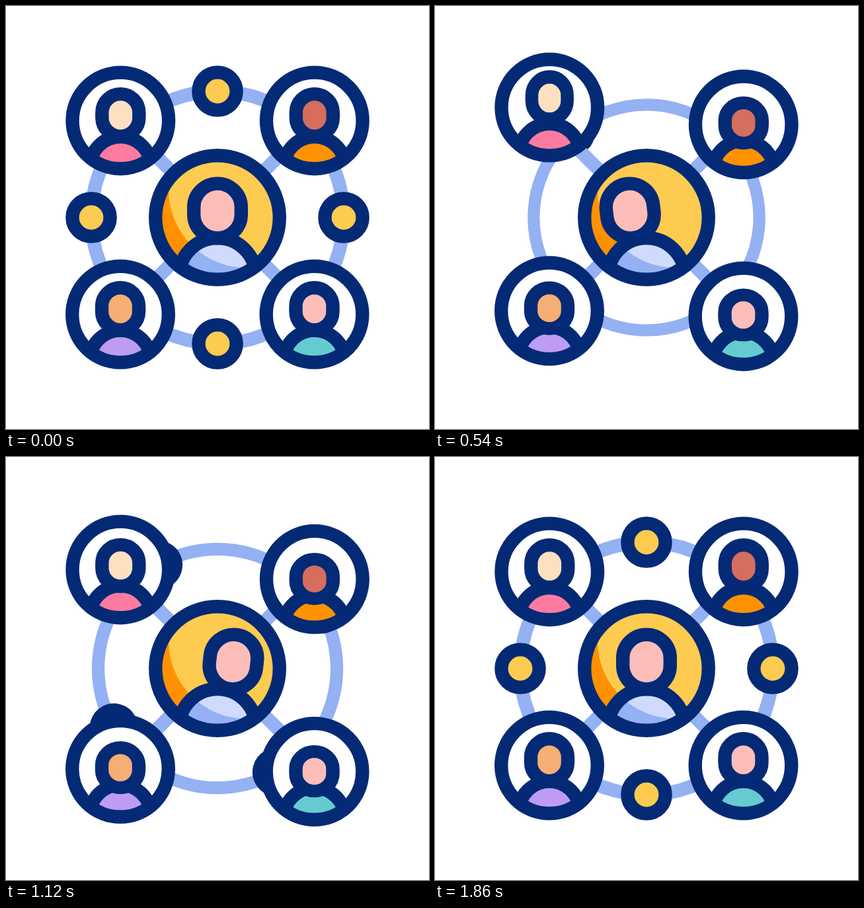
Recreate the animation shown at these times as an HTML page. Size 640 by 640 pixels, loop 2.4 s.

```html
<!DOCTYPE html>
<html>
<head>
<meta charset="utf-8">
<style>
  html, body { margin: 0; width: 100%; height: 100%; overflow: hidden; background: #fff; }
  svg { display: block; width: 100vw; height: 100vh; }
  .line { stroke: #042a76; stroke-width: 20.4; }
  .link { stroke: #93b1f3; stroke-width: 20.4; fill: none; }
</style>
</head>
<body>
<svg viewBox="0 0 640 640">
  <defs>
    <clipPath id="small"><circle r="70"/></clipPath>
    <clipPath id="big"><circle cx="320" cy="320" r="92"/></clipPath>
    <clipPath id="chest"><circle cx="320" cy="409" r="58"/></clipPath>
    <clipPath id="lit"><circle cx="363.5" cy="278.3" r="117.6"/></clipPath>
  </defs>
  <g id="orbit"></g>
  <path class="link" d="M173 173L467 467M467 173L173 467"/>
  <g id="people"></g>
  <g clip-path="url(#big)">
    <circle cx="320" cy="320" r="92" fill="#ff9100"/>
    <circle cx="320" cy="320" r="92" fill="#fdcb50" clip-path="url(#lit)"/>
    <g clip-path="url(#chest)">
      <circle cx="320" cy="409" r="58" fill="#93b1f3"/>
      <circle cx="320" cy="409" r="58" fill="#d0dafc" clip-path="url(#lit)"/>
    </g>
    <circle class="line" cx="320" cy="409" r="58" fill="none"/>
    <rect id="head" class="line" x="284.2" y="268.6" width="71.6" height="82.6" rx="35.8" fill="#fdbdb9"/>
  </g>
  <circle class="line" cx="320" cy="320" r="93.8" fill="none"/>
</svg>
<script>
const $ = id => document.getElementById(id);

// x, y, delay, skin, shirt
const people = [
  [173.3, 173.4, 0, '#fde0c0', '#fe7ba0'],
  [466.8, 173.4, 170, '#d66e5e', '#fe9200'],
  [173, 466.5, 90, '#f6ae74', '#be9cf4'],
  [466.5, 466.5, 140, '#fdbdb9', '#66cbd0']
];

// keys as [time, value]
const ringSize = [[20, 1], [680, .881], [1520, 1]];
const sway = [[20, 0], [480, -26], [1100, 24], [1590, 0]];
const bounce = [[120, 0], [350, 6.5], [580, -22], [880, 13.7], [1250, -9.5], [1520, 0]];
const nod = [[180, 0], [400, 8.5], [620, -12], [960, 10.8], [1290, -5.8], [1600, 0]];

$('orbit').innerHTML = '<circle class="link" r="191"/>' + [0, 90, 180, 270].map(a =>
  `<circle class="line" cy="-191" r="28.6" fill="#fdcb50" transform="rotate(${a})"/>`).join('');

$('people').innerHTML = people.map(([, , , skin, shirt]) => `<g>
  <circle r="72.8" fill="#fff"/>
  <g clip-path="url(#small)">
    <circle class="line" cy="71" r="46.6" fill="${shirt}"/>
    <g><rect class="line" x="-28" y="10.2" width="56" height="64" rx="28" fill="${skin}"/></g>
  </g>
  <circle class="line" r="72.8" fill="none"/></g>`).join('');

const smooth = u => u * u * (3 - 2 * u);

// slightly sharper ease: solves the curve (.362, 0, .638, 1) for x = u
function ease(u) {
  let lo = 0, hi = 1;
  for (let i = 0; i < 20; i++) {
    const s = (lo + hi) / 2, r = 1 - s;
    if (3 * s * r * (r * .362 + s * .638) + s * s * s < u) lo = s; else hi = s;
  }
  return smooth(lo);
}

function at(keys, t, curve) {
  if (t <= keys[0][0]) return keys[0][1];
  for (let i = 1; i < keys.length; i++) {
    const [t0, a] = keys[i - 1], [t1, b] = keys[i];
    if (t < t1) return a + (b - a) * curve((t - t0) / (t1 - t0));
  }
  return keys[keys.length - 1][1];
}

function draw() {
  const t = performance.now() % 2400;
  const turn = at([[20, 0], [1520, 180]], t, ease);
  $('orbit').setAttribute('transform',
    `translate(320 320) rotate(${turn}) scale(${at(ringSize, t, ease)})`);

  const x = at(sway, t, ease);
  $('head').setAttribute('transform', `translate(${x} 0) rotate(${x * .26} 320 310)`);

  people.forEach(([px, py, delay], i) => {
    const g = $('people').children[i];
    const h = at(nod, t - delay, smooth);
    g.setAttribute('transform', `translate(${px} ${py + at(bounce, t - delay, smooth)})`);
    const sx = 1 + .007 * Math.min(h, 0), sy = 1 - .006 * Math.max(h, 0);
    g.children[1].children[1].setAttribute('transform',
      `translate(0 ${h - 50.5}) scale(${sx} ${sy})`);
  });
  requestAnimationFrame(draw);
}
draw();
</script>
</body>
</html>
```
